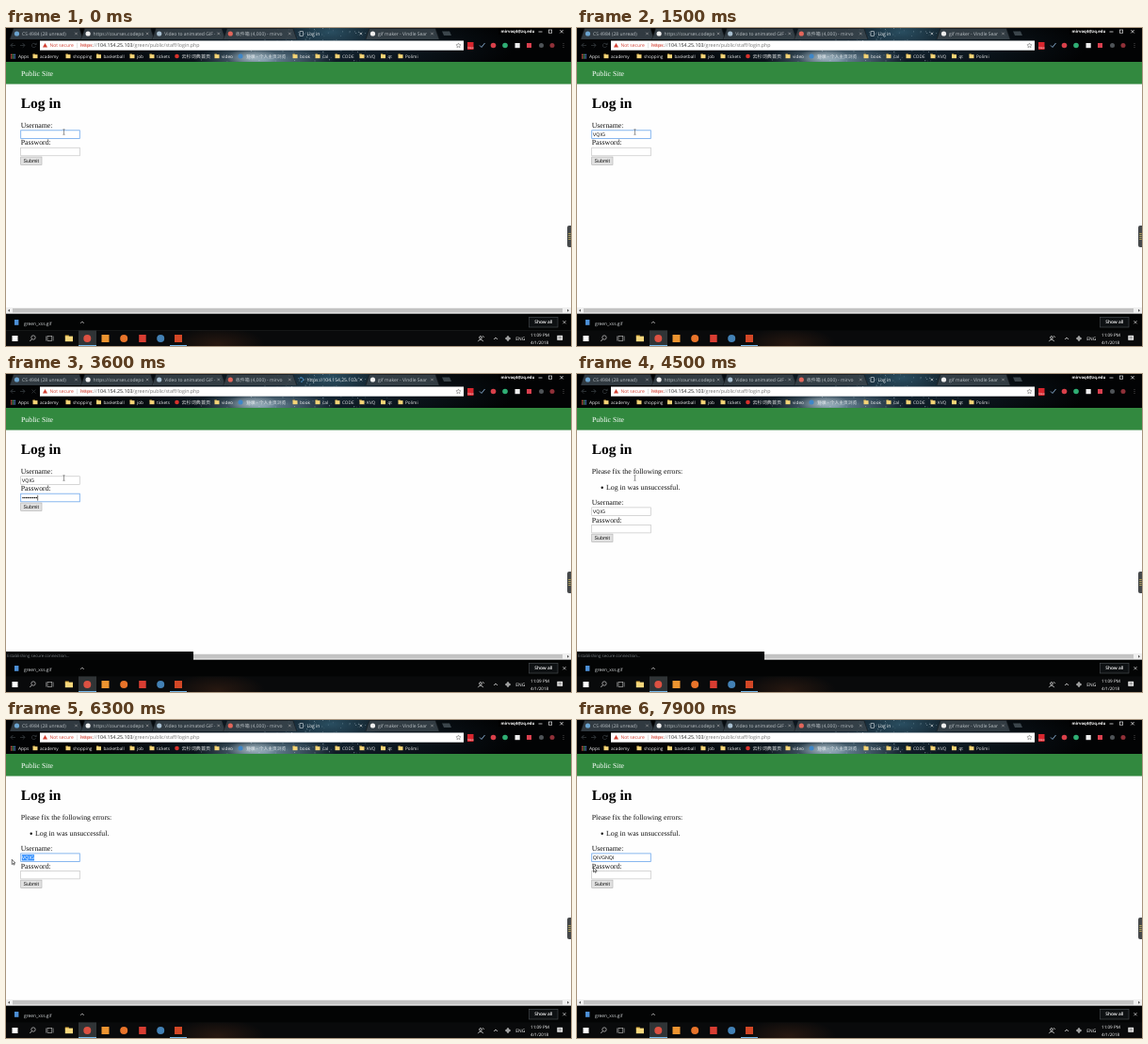
Recreate the animation shown at these times as an HTML page with a canvas. Size 600 by 338 pixels, loop 8 s.

```html
<!DOCTYPE html>
<html lang="en">
<head>
<meta charset="utf-8">
<title>Log in</title>
<style>
html, body { margin: 0; width: 100%; height: 100%; overflow: hidden; background: #fff; }
canvas { display: block; width: 600px; height: 338px; }
</style>
</head>
<body>
<canvas id="stage" width="600" height="338"></canvas>
<script>
const ctx = document.getElementById('stage').getContext('2d');
const LOOP = 8000;
const UI = '"Open Sans", "Noto Sans CJK SC", "Noto Sans CJK", sans-serif';
const SERIF = '"Liberation Serif", serif';
const SANS = '"Liberation Sans", sans-serif';

function rect(x, y, w, h, color) {
  ctx.fillStyle = color;
  ctx.fillRect(x, y, w, h);
}
function disc(x, y, r, color) {
  ctx.fillStyle = color;
  ctx.beginPath();
  ctx.arc(x, y, r, 0, Math.PI * 2);
  ctx.fill();
}
function ring(x, y, r, color, from = 0, to = Math.PI * 2, width = 0.8) {
  ctx.strokeStyle = color;
  ctx.lineWidth = width;
  ctx.beginPath();
  ctx.arc(x, y, r, from, to);
  ctx.stroke();
}
function box(x, y, w, h, color, width = 0.6) {
  ctx.strokeStyle = color;
  ctx.lineWidth = width;
  ctx.strokeRect(x, y, w, h);
}
function path(points, color, width = 0.8) {
  ctx.strokeStyle = color;
  ctx.lineWidth = width;
  ctx.beginPath();
  for (let i = 0; i < points.length; i += 2) ctx.lineTo(points[i], points[i + 1]);
  ctx.stroke();
}
function shape(points, color) {
  ctx.fillStyle = color;
  ctx.beginPath();
  for (let i = 0; i < points.length; i += 2) ctx.lineTo(points[i], points[i + 1]);
  ctx.fill();
}
function text(str, x, y, size, color, family = UI, weight = '') {
  ctx.font = `${weight} ${size}px ${family}`;
  ctx.fillStyle = color;
  ctx.fillText(str, x, y);
}
function cross(x, y, r, color, width) {
  path([x - r, y - r, x + r, y + r], color, width);
  path([x - r, y + r, x + r, y - r], color, width);
}
function clipped(x, y, w, h, paint) {
  ctx.save();
  ctx.beginPath();
  ctx.rect(x, y, w, h);
  ctx.clip();
  paint();
  ctx.restore();
}
function glow(x, y, rx, ry, rgb, alpha) {
  ctx.save();
  ctx.translate(x, y);
  ctx.scale(rx, ry);
  const g = ctx.createRadialGradient(0, 0, 0, 0, 0, 1);
  g.addColorStop(0, `rgba(${rgb},${alpha})`);
  g.addColorStop(1, `rgba(${rgb},0)`);
  rect(-1, -1, 2, 2, g);
  ctx.restore();
}

function sky() {
  rect(0, 0, 600, 36, '#020304');
  clipped(0, 0, 600, 36, () => {
    glow(310, 20, 230, 50, '28,54,74', 0.75);
    glow(345, 4, 60, 20, '60,112,136', 0.6);
    glow(275, 34, 75, 17, '150,185,205', 0.7);
    glow(262, 31, 28, 9, '225,238,245', 0.55);
    let seed = 11;
    const rnd = () => (seed = seed * 16807 % 2147483647) / 2147483647;
    for (let i = 0; i < 170; i++) {
      const x = 195 + (rnd() + rnd()) * 115;
      rect(x, rnd() * 36, 0.8, 0.8, `rgba(215,232,245,${rnd() * 0.75})`);
    }
  });
}

function tab(i, title, icon, active) {
  const x = 4 + i * 75.6;
  if (!active) {
    const edge = [x, 12, x + 4, 0.5, x + 74, 0.5, x + 78, 12];
    shape(edge, 'rgba(58,69,76,.85)');
    path(edge, '#15191c', 0.6);
  }
  if (icon) disc(x + 7.5, 6, 2.6, icon);
  clipped(x + 12, 0, 55, 12, () => {
    text(title, x + 13, 8, 5, active ? '#f2f4f5' : '#bdc3c7');
  });
  cross(x + 70.5, 6, 1.3, active ? '#eee' : '#aaa', 0.6);
}

function folder(x) {
  rect(x, 27.5, 2.3, 1.2, '#e2b84d');
  rect(x, 28.2, 5, 4, '#f5d577');
}

function browser(t, loading) {
  sky();
  tab(0, 'CS 4984 (28 unread)', '#6ba3cf');
  tab(1, 'https://courses.codepo', '#eeeeee');
  tab(2, 'Video to animated GIF - ', '#a8bfd0');
  tab(3, '收件箱 (4,000) - mirvo', '#e2665b');
  tab(5, 'gif maker - Vindle Sear', '#eeeeee');
  tab(4, loading ? 'https://104.154.25.103/g' : 'Log in', null, true);
  if (loading) {
    const a = t / 160;
    ring(313.5, 6, 2.2, '#58a7e8', a, a + 4.4, 0.9);
  } else {
    box(312, 3.7, 3.4, 4.6, '#dde3e8', 0.6);
  }
  shape([463, 3.5, 471, 3.5, 473, 8, 465, 8], '#3b454b');

  rect(523, 0, 37, 7, '#000');
  text('mirvoq4@zq.edu', 525.5, 5, 4.3, '#fff', UI, 'bold');
  path([565.5, 4, 569.5, 4], '#fff', 0.7);
  box(576.5, 2, 3.2, 3.2, '#fff');
  cross(590, 3.7, 1.7, '#fff', 0.7);

  const dim = '#33383c';
  path([10, 18.5, 5, 18.5, 7.2, 16.3, 5, 18.5, 7.2, 20.7], dim);
  path([15, 18.5, 20, 18.5, 17.8, 16.3, 20, 18.5, 17.8, 20.7], dim);
  if (loading) cross(29.5, 18.5, 2, dim, 0.8);
  else {
    ring(29.5, 18.5, 2.2, dim, 0.3, 5.5);
    shape([32.5, 15.5, 32.5, 18, 30, 18], dim);
  }
  rect(36, 13.5, 450, 10.2, '#fff');
  shape([41.5, 16, 44, 20.6, 39, 20.6], '#d23f31');
  text('Not secure', 46.5, 20.4, 5, '#d23f31');
  rect(75.5, 15.5, 0.5, 6, '#c5c5c5');
  let x = 79;
  for (const [part, color] of [['https', '#d23f31'], ['://', '#888'],
    ['104.154.25.103', '#222'], ['/green/public/staff/login.php', '#777']]) {
    text(part, x, 20.4, 5.3, color);
    x += ctx.measureText(part).width;
  }
  path([79, 18.8, 91, 18.8], '#d23f31', 0.4);

  const star = [];
  for (let i = 0; i <= 10; i++) {
    const a = -Math.PI / 2 + i * Math.PI / 5, r = i % 2 ? 1.2 : 2.7;
    star.push(480.5 + r * Math.cos(a), 18.6 + r * Math.sin(a));
  }
  path(star, '#666', 0.5);

  rect(490, 15, 6.5, 8, '#d8262e');
  text('New', 490.3, 21.9, 3, '#fff');
  path([503, 18.5, 505, 20.5, 508.5, 16], '#7fa3c4', 1);
  disc(517.5, 18.5, 2.8, '#d8404a');
  disc(530, 18.5, 2.8, '#2fae74');
  rect(540.5, 16, 5.2, 5.2, '#eee');
  rect(553, 16, 5, 5, '#d9404f');
  disc(568.5, 18.5, 2.5, '#4e5357');
  disc(580, 18.5, 2.5, '#8f3038');
  for (let i = -1; i < 2; i++) disc(592, 18.5 + i * 1.9, 0.5, '#666');

  for (let i = 0; i < 9; i++) {
    rect(5 + i % 3 * 1.8, 27.7 + Math.floor(i / 3) * 1.8, 1.3, 1.3, ['#e15b4d', '#58a868', '#5c8fe0'][i % 3]);
  }
  const marks = [['academy', 36], ['shopping', 71], ['basketball', 103.5], ['job', 139],
    ['tickets', 160], ['video', 229], ['book', 312], ['cal', 336], ['CODE', 357],
    ['KVQ', 383], ['qt', 405.5], ['Polimi', 424]];
  text('Apps', 13, 31.8, 4.8, '#eee');
  for (const [name, left] of marks) {
    folder(left - 7.5);
    text(name, left, 31.8, 4.7, '#eee');
  }
  disc(181.5, 30, 2.3, '#d8322c');
  text('云杉词典首页', 186.5, 32, 5.1, '#eee');
  disc(249, 30, 2.5, '#3f87c8');
  text('登录 - 个人主页浏览', 255, 32, 4.8, '#e4e9ed');
}

function field(y, value, focus, caret) {
  rect(15.7, y, 62.6, 8.6, '#fff');
  box(15.7, y, 62.6, 8.6, focus ? '#6ba6ec' : '#bcbcbc', focus ? 0.8 : 0.6);
  text(value, 16.8, y + 6.3, 5.3, '#111', SANS);
  if (caret) rect(17.2 + ctx.measureText(value).width, y + 1.6, 0.6, 5.8, '#111');
}

function page(s) {
  rect(0, 59, 600, 238, '#fefefe');
  rect(0, 36, 600, 23.6, '#32893f');
  text('Public Site', 16, 50.6, 7.8, '#fff', SERIF);
  text('Log in', 15.7, 85, 15.5, '#000', SERIF, 'bold');
  let dy = 0;
  if (s.failed) {
    dy = 33.1;
    text('Please fix the following errors:', 15.7, 106.2, 7.8, '#111', SERIF);
    disc(26.7, 120.8, 1.2, '#111');
    text('Log in was unsuccessful.', 31, 122.7, 7.8, '#111', SERIF);
  }
  text('Username:', 15.7, 106.2 + dy, 7.8, '#111', SERIF);
  field(108.8 + dy, s.user, s.focus === 'user', s.focus === 'user' && s.blink && !s.selected);
  if (s.selected) {
    const full = ctx.measureText(s.user).width;
    const w = full * s.selected, left = 16.8 + full - w;
    rect(left, 110 + dy, w, 6.4, '#3390ff');
    clipped(left, 109 + dy, w, 9, () => {
      text(s.user, 16.8, 115.1 + dy, 5.3, '#fff', SANS);
    });
  }
  text('Password:', 15.7, 124.4 + dy, 7.8, '#111', SERIF);
  field(127.2 + dy, '', s.focus === 'pass', false);
  for (let i = 0; i < s.dots; i++) disc(18 + i * 1.8, 131.6 + dy, 0.75, '#111');
  if (s.focus === 'pass' && s.blink) rect(17.3 + s.dots * 1.8, 128.8 + dy, 0.6, 5.8, '#111');
  rect(15.7, 137 + dy, 22.3, 8.3, '#e1e1e1');
  box(15.7, 137 + dy, 22.3, 8.3, '#adadad');
  text('Submit', 18.6, 142.9 + dy, 5.25, '#111', SANS);

  ctx.fillStyle = '#46494b';
  ctx.beginPath();
  ctx.roundRect(596, 210, 6, 23, 2);
  ctx.fill();
  for (let i = 0; i < 4; i++) rect(597.2, 218 + i * 2, 2.5, 0.8, '#c9b25c');

  rect(0, 297, 600, 6.5, '#f0f0f0');
  rect(7, 298, 584, 4.4, '#c3c3c3');
  shape([2, 300.2, 4, 298.7, 4, 301.7], '#555');
  shape([598, 300.2, 596, 298.7, 596, 301.7], '#555');
  if (s.status) {
    rect(0, 295, 199, 9, '#060708');
    text('Establishing secure connection...', 1, 301, 4.4, '#7b8185');
  }
}

function desktop() {
  rect(0, 303.5, 600, 18, '#030404');
  rect(9, 310, 4.4, 5.8, '#4c8fd6');
  text('green_xss.gif', 19, 315.7, 4.9, '#d5d8da');
  path([79, 313.9, 81, 312, 83, 313.9], '#ccc', 0.7);
  rect(555.5, 307.3, 30.5, 10.7, '#0e1113');
  box(555.5, 307.3, 30.5, 10.7, '#4b5054');
  text('Show all', 561.3, 314.4, 4.8, '#fff', UI, '600');
  cross(593, 312.7, 1.6, '#ddd', 0.7);

  rect(0, 321.5, 600, 16.5, '#090a0b');
  clipped(0, 321.5, 600, 16.5, () => glow(225, 336, 50, 18, '70,38,22', 0.5));
  rect(77, 321.5, 19, 16.5, '#303436');
  rect(6.5, 327, 6, 6, '#fff');
  ring(29, 329, 2.2, '#ccc', 0, 6.3, 0.7);
  path([27.4, 330.7, 25.3, 333], '#ccc');
  box(44, 327.5, 4.8, 5, '#ccc', 0.6);
  path([42.6, 327.5, 42.6, 332.5], '#ccc', 0.5);
  path([50.2, 327.5, 50.2, 332.5], '#ccc', 0.5);
  rect(62.8, 326.5, 4, 2, '#d9a93c');
  rect(62.8, 327.6, 8.2, 5.6, '#f6d77c');
  disc(86.3, 330, 4, '#dc5142');
  rect(101.5, 326, 8, 8, '#ed9430');
  disc(125.2, 330, 4, '#e8742a');
  rect(141.2, 326, 7.5, 8, '#d83d32');
  disc(164.2, 330, 4, '#4381b5');
  rect(179, 326, 8, 8, '#d24726');
  rect(77, 337, 19, 1, '#76b9ed');
  rect(174, 337, 18, 1, '#76b9ed');

  ring(504, 329, 1.4, '#eee', 0, 6.3, 0.7);
  ring(504, 334, 2.8, '#eee', Math.PI * 1.1, Math.PI * 1.9, 0.7);
  path([506, 327, 508, 329], '#eee', 0.6);
  path([518, 331, 520, 329, 522, 331], '#eee', 0.7);
  path([530, 330, 536, 330], '#eee', 0.8);
  path([533, 327, 533, 333], '#eee', 0.8);
  ring(533, 330, 1.8, '#eee', 0, 6.3, 0.5);
  text('ENG', 541.3, 332, 4.9, '#fff');
  text('11:09 PM', 557, 328.4, 4.6, '#fff');
  text('4/1/2018', 557, 335.8, 4.6, '#fff');
  rect(585.3, 326.8, 5.8, 5, '#eee');
  path([586.5, 328.4, 590, 328.4], '#222', 0.5);
  path([586.5, 330, 590, 330], '#222', 0.5);
}

// Pointer stops: time, x, y
const STOPS = [[0, 61.5, 110.5], [4700, 61.5, 110.5], [5300, 57, 144], [5700, 57, 144],
  [5900, 33, 146], [6450, 1, 150], [7150, 1, 150], [7800, 18, 157.5], [8000, 18, 157.5]];

function pointer(t) {
  const i = STOPS.findIndex(p => p[0] > t);
  const [t0, x0, y0] = STOPS[i - 1], [t1, x1, y1] = STOPS[i];
  const u = (t - t0) / (t1 - t0), e = u * u * (3 - 2 * u);
  const x = x0 + (x1 - x0) * e, y = y0 + (y1 - y0) * e;
  if (t < 6200) {
    path([x, y - 2.7, x, y + 2.7], '#555', 0.6);
    path([x - 1.2, y - 2.8, x + 1.2, y - 2.8], '#555', 0.5);
    path([x - 1.2, y + 2.8, x + 1.2, y + 2.8], '#555', 0.5);
  } else {
    const arrow = [0, 0, 0, 5.2, 1.2, 4.1, 2, 5.8, 2.8, 5.4, 2.1, 3.8, 3.6, 3.8, 0, 0];
    const pts = arrow.map((v, k) => v + (k % 2 ? y - 1 : x - 0.5));
    shape(pts, '#fff');
    path(pts, '#111', 0.6);
  }
}

const clamp = (v, lo, hi) => Math.max(lo, Math.min(hi, v));
const typed = (t, start, step) => Math.max(0, Math.floor((t - start) / step) + 1);

function state(t) {
  const failed = t >= 4200;
  const s = { failed, dots: 0, focus: '', selected: 0, status: t >= 3400 && t < 5000 };
  s.loading = t >= 3300 && t < 4200;
  if (!failed) {
    s.user = 'VQIG'.slice(0, typed(t, 700, 200));
    s.focus = t < 1900 ? 'user' : 'pass';
    s.dots = Math.min(9, typed(t, 2100, 120));
  } else if (t < 6640) {
    s.user = 'VQIG';
    if (t >= 5700) s.focus = 'user';
    s.selected = clamp((t - 5750) / 300, 0, 1);
  } else {
    s.user = 'QIVGNQI'.slice(0, typed(t, 6640, 200));
    s.focus = 'user';
  }
  s.blink = t % 1000 >= 500 && t < 1400 || t >= 2000 && t < 4200 || t >= 6640 && t < 7400;
  return s;
}

function draw(t) {
  const s = state(t);
  ctx.textRendering = 'geometricPrecision';
  browser(t, s.loading);
  desktop();
  page(s);
  pointer(t);
}

function tick() {
  draw(performance.now() % LOOP);
  requestAnimationFrame(tick);
}
tick();
</script>
</body>
</html>
```
